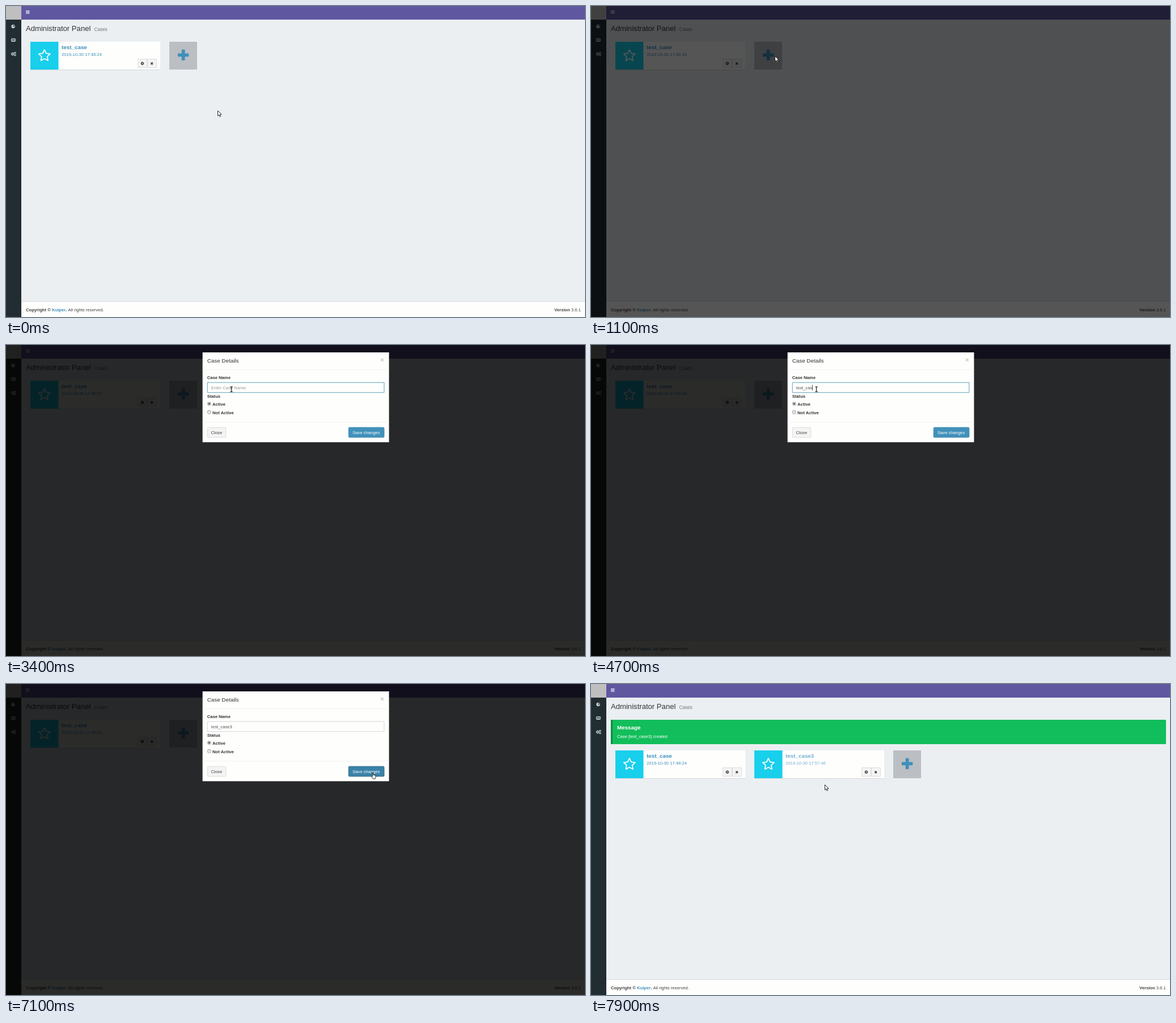
An HTML page with a canvas for the animation above (8000 ms loop, 1021x548 px).

```html
<!DOCTYPE html>
<html lang="en">
<head>
<meta charset="utf-8">
<title>Case panel</title>
<style>
html, body { margin: 0; width: 100%; height: 100%; overflow: hidden; background: #ebeff2; }
canvas { display: block; }
</style>
</head>
<body>
<canvas id="stage" width="1021" height="548"></canvas>
<script>
const c = document.getElementById('stage').getContext('2d');
const LOOP = 8000;
const S = 0.547; // page zoom
const FAMILY = '"Liberation Sans", Arial, sans-serif';

const LINK = '#3f8fbb', HOVER = '#72afd2', ICON = '#b8c7ce', SIDE = '#222d32';
const WHITE = '#fefefd', INK = '#333333', GLYPH = '#444444', BUTTON = '#f4f4f4', EDGE = '#dddddd';

const clamp = v => Math.min(1, Math.max(0, v));

function rect(x, y, w, h, fill) {
  c.fillStyle = fill;
  c.fillRect(x, y, w, h);
}

function box(x, y, w, h, r, fill, edge) {
  c.beginPath();
  c.roundRect(x + .5, y + .5, w - 1, h - 1, r);
  c.fillStyle = fill;
  c.fill();
  c.strokeStyle = edge;
  c.lineWidth = 1;
  c.stroke();
}

function disc(x, y, r, fill) {
  c.beginPath();
  c.arc(x, y, r, 0, Math.PI * 2);
  c.fillStyle = fill;
  c.fill();
}

// Returns the x where the text ends.
function text(str, x, y, color, size = 14, bold = false) {
  c.font = `${bold ? 'bold ' : ''}${size * S}px ${FAMILY}`;
  c.fillStyle = color;
  c.fillText(str, x, y);
  return x + c.measureText(str).width;
}

function star(x, y) {
  c.beginPath();
  for (let i = 0; i < 10; i++) {
    const a = -Math.PI / 2 + i * Math.PI / 5, r = i % 2 ? 5.2 : 10.6;
    c.lineTo(x + r * Math.cos(a), y + r * Math.sin(a));
  }
  c.closePath();
  c.lineJoin = 'round';
  c.strokeStyle = '#ffffff';
  c.lineWidth = 1.8;
  c.stroke();
}

function gear(x, y, r, color, hole) {
  c.fillStyle = color;
  for (let i = 0; i < 4; i++) {
    c.save();
    c.translate(x, y);
    c.rotate(i * Math.PI / 4);
    c.fillRect(-r * .22, -r, r * .44, r * 2);
    c.restore();
  }
  disc(x, y, r * .78, color);
  disc(x, y, r * .34, hole);
}

function plus(x, y, color) {
  c.fillStyle = color;
  c.beginPath();
  c.roundRect(x - 9.7, y - 2.9, 19.4, 5.8, 1.3);
  c.roundRect(x - 2.9, y - 9.7, 5.8, 19.4, 1.3);
  c.fill();
}

function cross(x, y, r) {
  c.strokeStyle = GLYPH;
  c.lineWidth = 1.7;
  c.beginPath();
  for (const d of [-r, r]) {
    c.moveTo(x - r, y - d);
    c.lineTo(x + r, y + d);
  }
  c.stroke();
}

function sidebar() {
  rect(0, 24, 27, 524, SIDE);
  rect(0, 0, 27, 24, '#bfbfc0');
  disc(12.6, 36, 3.3, ICON);
  disc(13.8, 35.2, 1.1, SIDE);
  box(9, 57, 8, 6, .6, SIDE, ICON);
  for (let i = 0; i < 3; i++) rect(10, 57.5 + i * 1.8, 6, .9, ICON);
  gear(11.7, 84.6, 2.9, ICON, SIDE);
  gear(16, 82.5, 1.8, ICON, SIDE);
  gear(16, 86.6, 1.8, ICON, SIDE);
}

function card(x, y, name, date, color) {
  rect(x, y + 49, 229, 1, '#d3d6d9');
  rect(x, y, 229, 49, WHITE);
  rect(x, y, 49.5, 49, '#18cfec');
  star(x + 24.8, y + 24.6);
  text(name, x + 55, y + 12.7, color, 18, true);
  text(date, x + 55, y + 24.7, color);
  for (const dx of [189, 206]) box(x + dx, y + 30, 17, 16, 0, BUTTON, EDGE);
  gear(x + 197.4, y + 38.2, 2.9, GLYPH, BUTTON);
  cross(x + 214.2, y + 38.3, 1.8);
}

function message() {
  c.beginPath();
  c.roundRect(35, 63, 979, 43, 1.6);
  c.fillStyle = '#12be5b';
  c.fill();
  rect(35, 63, 3, 43, '#0c8a45');
  text('Message', 46, 79.5, '#ffffff', 18, true);
  text('Case [test_case3] created', 46, 95.2, '#ffffff');
}

function page({ created, overPlus, overCard }) {
  rect(0, 0, 1021, 548, '#ebeff2');
  rect(27, 0, 994, 24, '#5f57a0');
  for (let i = 0; i < 3; i++) rect(35, 8 + i * 2.2, 6.6, 1.1, '#ffffff');
  sidebar();
  text('Administrator Panel', 35, 44.2, INK, 24);
  text('Cases', 155.5, 44.2, '#777777', 15);

  const y = created ? 117 : 63, addX = created ? 533 : 288;
  card(43, y, 'test_case', '2019-10-30 17:48:24', LINK);
  if (created) {
    message();
    card(288, y, 'test_case3', '2019-10-30 17:57:46', overCard ? HOVER : LINK);
  }
  rect(addX, y, 49, 49, '#bbbec2');
  plus(addX + 24.6, y + 23.4, overPlus ? HOVER : LINK);

  rect(27, 520, 994, 1, '#d2d6de');
  rect(27, 521, 994, 27, WHITE);
  let x = text('Copyright © ', 35, 537.7, GLYPH, 14, true);
  x = text('Kuiper', x, 537.7, LINK, 14, true);
  x = text('.', x, 537.7, GLYPH, 14, true);
  text(' All rights reserved.', x, 537.7, GLYPH);
  x = text('Version', 967, 537.7, GLYPH, 14, true);
  text(' 3.6.1', x, 537.7, GLYPH);
}

function radio(label, y, on) {
  disc(358.3, y, 3.3, '#8e8e8e');
  disc(358.3, y, 2.6, '#e6e6e6');
  if (on) disc(358.3, y, 1.6, '#4a4a4a');
  text(label, 364, y + 3.7, INK, 14, true);
}

// Bursts of typing, one key every 80 ms.
const BURSTS = { te: 3520, st: 3800, _: 4200, case: 4500, 3: 5200 };
const ORDER = ['te', 'st', '_', 'case', '3'];

function typed(t) {
  return ORDER.map(part => part.slice(0, Math.max(0, Math.floor((t - BURSTS[part]) / 80) + 1))).join('');
}

function field(t) {
  const focused = t >= 2400 && t < 6900;
  box(354.7, 65.6, 312.6, 18.7, 0, WHITE, focused ? '#5f9fb9' : '#d2d5d8');
  const value = typed(t);
  const end = text(value, 361.8, 77.8, '#555555');
  if (!value) text('Enter Case Name:', 361.8, 77.8, '#999999');
  const blinkedOff = t >= 3400 && !value;
  if (t >= 2500 && t < 5800 && !blinkedOff) rect(Math.round(end), 70, 1, 10, '#555555');
}

function modal(t) {
  rect(346.6, 13, 328.8, 158.3, WHITE);
  for (const y of [43, 135.5]) rect(346.6, y, 328.8, 1, '#f1f1f1');
  text('Case Details', 354.7, 31.4, INK, 18);
  text('×', 660.1, 30.3, '#c4c4c4', 21, true);
  text('Case Name', 354.7, 60.3, INK, 14, true);
  field(t);
  text('Status', 354.7, 92.7, INK, 14, true);
  radio('Active', 103.6, true);
  radio('Not Active', 118.4, false);

  box(354.7, 144.7, 33.6, 18.6, 1.6, BUTTON, EDGE);
  text('Close', 361.6, 156.7, GLYPH);
  const fill = t >= 6500 ? '#3a82a8' : '#4191ba';
  box(603.7, 144.7, 63.6, 18.6, 1.6, fill, t >= 7000 ? '#2b6587' : '#3b88b1');
  text('Save changes', 611, 156.7, '#ffffff');
}

function outline(path, x, y) {
  c.save();
  c.translate(x, y);
  const shape = new Path2D(path);
  c.fillStyle = '#ffffff';
  c.strokeStyle = '#22262a';
  c.lineWidth = 1;
  c.lineJoin = 'round';
  c.fill(shape);
  c.stroke(shape);
  c.restore();
}

const arrow = (x, y) => outline('M.5 .5v9.2l2.1-1.9 1.5 3.3 1.5-.7-1.4-3.1 2.9-.2z', x, y);
const hand = (x, y) => outline('M2.2 .6h1.4l.2 3.6 4.2 1v3l-1 2.8H3.2L.6 7l.6-.8 1 .8z', x - 2, y - 1);

function beam(x, y) {
  rect(x - .7, y - 4.5, 1.4, 9, INK);
  for (const dy of [-5, 3.8]) rect(x - 2.2, y + dy, 4.4, 1.2, INK);
}

// Pointer moves: from one resting place to the next.
const HOME = { x: 373, y: 184 };
const MOVES = [
  { from: 300, to: 700, x: 324, y: 88 },
  { from: 1200, to: 1600, x: 497, y: 78 },
  { from: 2000, to: 2400, x: 397.5, y: 78 },
  { from: 5700, to: 5900, x: 322, y: 167 },
  { from: 5900, to: 6100, x: 429, y: 117 },
  { from: 6100, to: 6600, x: 646, y: 157 },
  { from: 7800, to: 7900, x: 412, y: 177 }
];

function pointer(t) {
  let { x, y } = HOME;
  for (const m of MOVES) {
    const k = clamp((t - m.from) / (m.to - m.from));
    x += (m.x - x) * k;
    y += (m.y - y) * k;
  }
  const inField = (t >= 1600 && t < 2100) || (t >= 2400 && t < 5800);
  const onLink = (t >= 700 && t < 1100) || (t >= 6500 && t < 7700);
  (inField ? beam : onLink ? hand : arrow)(x, y);
}

function draw(now) {
  const t = Math.floor(now % LOOP / 100) * 100;
  page({ created: t >= 7500, overPlus: t >= 700 && t < 1000, overCard: t >= 7900 });
  if (t < 7300) {
    const shade = .83 * clamp((t - 980) / 150);
    rect(0, 0, 1021, 548, `rgba(0,0,0,${shade})`);
    if (t >= 1200) modal(t);
  }
  pointer(t);
}

const start = performance.now();
function tick() {
  draw(performance.now() - start);
  requestAnimationFrame(tick);
}
tick();
</script>
</body>
</html>
```
